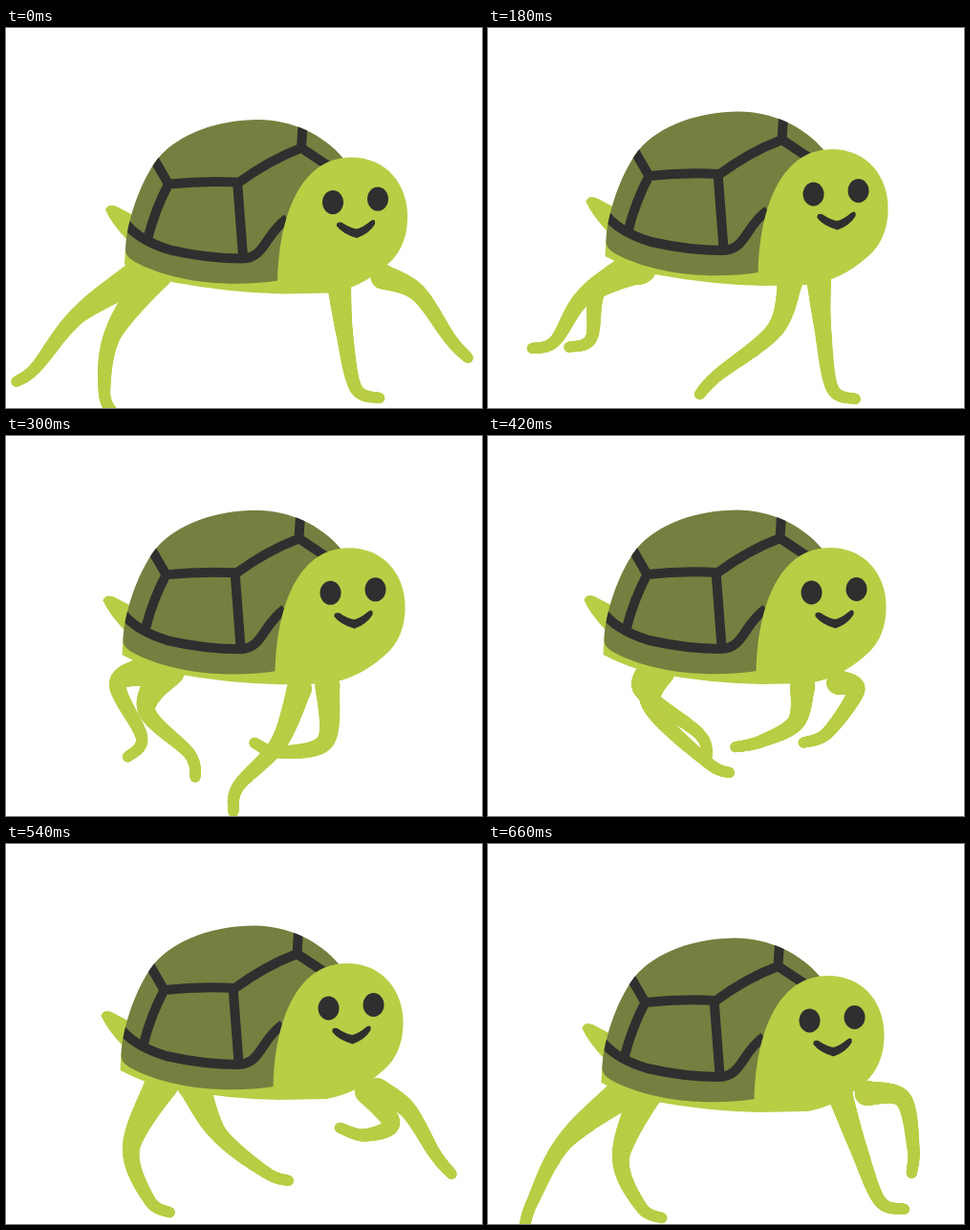
An HTML page with a canvas that plays this animation: 498 by 398 pixels, repeating every 0.72 s.

```html
<!DOCTYPE html>
<html lang="en">
<head>
<meta charset="utf-8">
<title>Running turtle</title>
<style>
html, body { margin: 0; width: 100%; height: 100%; overflow: hidden; background: #fff; }
canvas { display: block; }
</style>
</head>
<body>
<canvas id="stage" width="498" height="398"></canvas>
<script>
const ctx = document.getElementById('stage').getContext('2d');
const SKIN = '#b9cd45', SHELL = '#74803f', DARK = '#2f2f2f';
const STEP = 60, STEPS = 12;

// Height of the body, and [knee x, y, ankle x, y] of each leg, at six even points of the stride.
const bob = [[-5], [-9], [-18.7], [-19], [-11], [2]];
const hindLead = [
  [82, 288, 38, 334], [116, 272, 108, 325], [147, 287, 192, 333],
  [172, 285, 230, 342], [131, 318, 150, 373], [80, 312, 46, 376]
];
const hindTrail = [
  [95, 308, 61, 372], [100, 282, 70, 328], [117, 259, 142, 316],
  [163, 268, 220, 311], [222, 303, 272, 344], [139, 328, 160, 380]
];
const foreLead = [
  [321, 310, 317, 373], [300, 316, 240, 364], [334, 320, 285, 331],
  [385, 267, 355, 311], [420, 278, 449, 325], [388, 320, 410, 374]
];
const foreTrail = [
  [415, 293, 463, 337], [350, 312, 360, 377], [285, 322, 243, 367],
  [322, 300, 285, 320], [403, 293, 375, 305], [434, 267, 445, 318]
];

// The hip slides along with the knee; the paw curls back and forth once per stride.
const hind = {
  radii: [18, 9, 6.2, 5.5], paw: 25, curl: 10, swing: 50,
  hip: (kneeX, dy) => [118 + 0.35 * kneeX, 256 + 0.6 * dy]
};
const fore = {
  radii: [13, 9, 6.5, 5.5], paw: 27, curl: -8, swing: 48,
  hip: (kneeX, dy) => [136 + 0.6 * kneeX, 289 - 0.036 * kneeX - 0.03 * kneeX + 0.3 * dy]
};
const legs = [
  { ...hind, stride: hindLead, peak: 2.8 },
  { ...hind, stride: hindTrail, peak: 4.8 },
  { ...fore, stride: foreLead, peak: 6 },
  { ...fore, stride: foreTrail, peak: 9 }
];

const trunk = new Path2D('M125 230L124 248Q150 262 176 267Q235 278 290 279L340 278Q372 272 397 250L340 200L180 215Z');
const shell = new Path2D('M125 232C126 206 139 163 159 137C181 111 222 96.5 264 96.5C300 97 332 112 353 137L340 200L285 265C230 273 172 266 134 245Q124 239 125 232Z');
const seams = new Path2D('M122 201Q136 222 172 233Q212 242 247 242C272 241 270 217 294 200M155 138L170 164Q206 160 244 162Q275 139 309 126L311 94M309 126L345 150M170 164Q156 190 148 222M242 161L248 240');
const head = new Path2D('M284 266C285 202 306 136 361 136C399 136 420 165 420 198C420 222 411 239 397 250Z');
const tail = new Path2D('M104 191Q106 184 115 187L134 197L128 224Q110 205 104 191Z');
const mouth = new Path2D('M346 208Q345 203 351 204Q360 210 367 211Q374 209 381 203Q387 199 386 206Q380 216 367 220.5Q352 216 346 208Z');

const spline = (a, b, c, d, u) =>
  b + u / 2 * (c - a + u * (2 * a - 5 * b + 4 * c - d + u * (3 * (b - c) + d - a)));

// Value of a closed track; its points stand at the odd steps.
function cycle(track, step) {
  const pos = (step - 1) / 2 + track.length;
  const i = Math.floor(pos);
  const [a, b, c, d] = [-1, 0, 1, 2].map(k => track[(i + k) % track.length]);
  return b.map((v, n) => spline(a[n], v, c[n], d[n], pos - i));
}

function disc(x, y, rx, ry = rx) {
  ctx.beginPath();
  ctx.ellipse(x, y, rx, ry, 0, 0, 7);
  ctx.fill();
}

// Smooth tapering limb through the joints.
function limb(joints, radii) {
  const at = i => joints[Math.max(0, Math.min(joints.length - 1, i))];
  for (let i = 0; i < joints.length - 1; i++) {
    for (let u = 0; u <= 1; u += 1 / 32) {
      const [x, y] = [0, 1].map(n => spline(at(i - 1)[n], at(i)[n], at(i + 1)[n], at(i + 2)[n], u));
      disc(x, y, radii[i] + (radii[i + 1] - radii[i]) * u);
    }
  }
}

function drawLeg(leg, step, dy) {
  const [kx, ky, ax, ay] = cycle(leg.stride, step);
  const bend = leg.curl + leg.swing * Math.cos((step - leg.peak) / STEPS * 2 * Math.PI);
  const angle = Math.atan2(ay - ky, ax - kx) + bend * Math.PI / 180;
  const toe = [ax + leg.paw * Math.cos(angle), ay + leg.paw * Math.sin(angle)];
  limb([leg.hip(kx, dy), [kx, ky], [ax, ay], toe], leg.radii);
}

function drawShell() {
  ctx.save();
  ctx.fillStyle = SHELL;
  ctx.fill(shell);
  ctx.clip(shell);
  ctx.strokeStyle = DARK;
  ctx.lineWidth = 10;
  ctx.lineJoin = 'round';
  ctx.stroke(seams);
  ctx.restore();
}

function draw(step) {
  const [dy] = cycle(bob, step);
  ctx.clearRect(0, 0, 498, 398);
  ctx.fillStyle = SKIN;
  legs.forEach(leg => drawLeg(leg, step, dy));

  ctx.save();
  ctx.translate(-step / 2, dy);
  ctx.fill(trunk);
  ctx.fill(tail);
  drawShell();
  ctx.fill(head);
  ctx.fillStyle = DARK;
  disc(342, 183, 11, 12.5);
  disc(389, 179.5, 11, 12.5);
  ctx.fill(mouth);
  ctx.restore();
}

function tick() {
  draw(Math.floor(performance.now() / STEP) % STEPS);
  requestAnimationFrame(tick);
}
tick();
</script>
</body>
</html>
```
